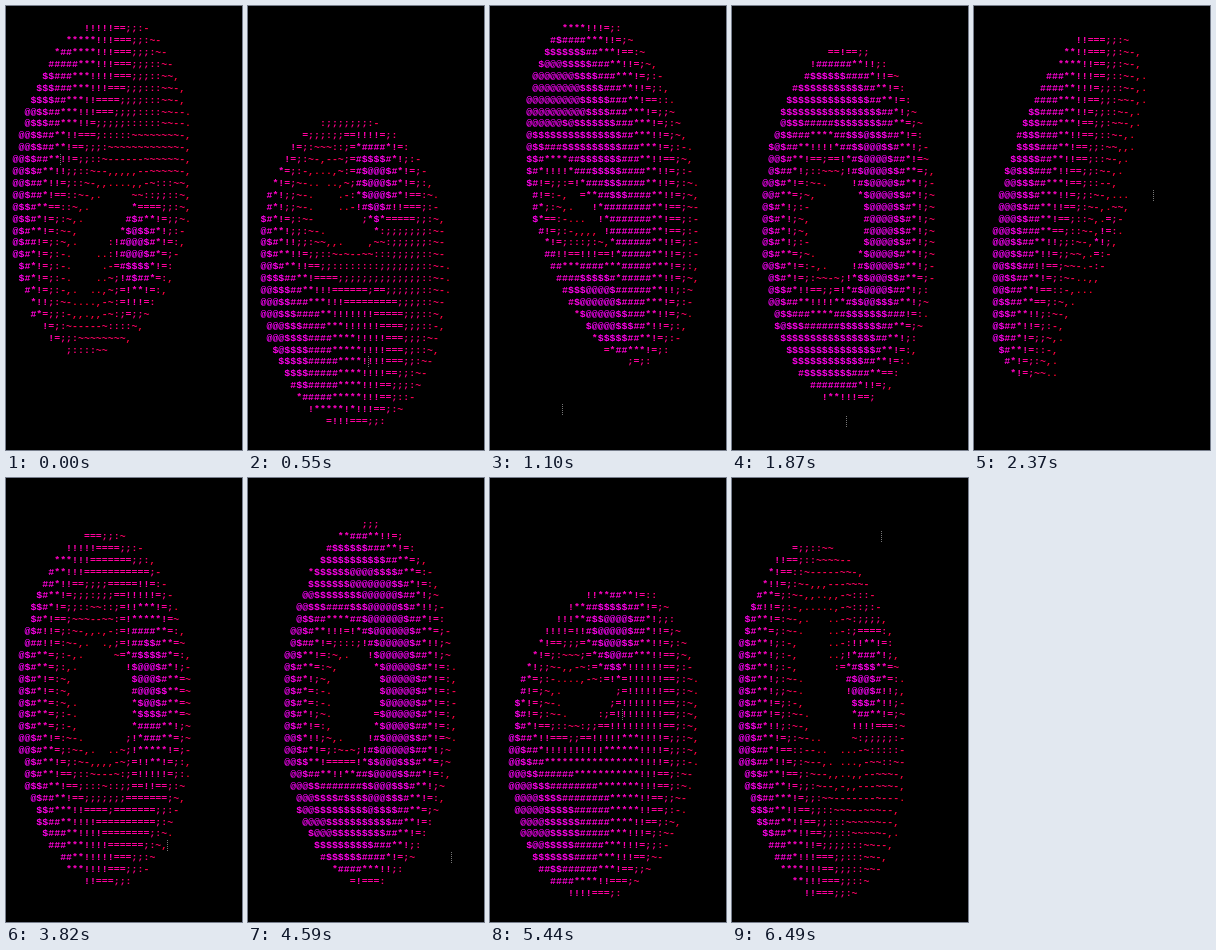
These frames come from a looping animation (236x444 px, 6.56 s). An HTML page with a canvas:

```html
<!DOCTYPE html>
<html>
<head>
<meta charset="utf-8">
<style>
html, body { margin: 0; height: 100%; overflow: hidden; background: #000; }
canvas { display: block; }
</style>
</head>
<body>
<canvas id="stage" width="236" height="444"></canvas>
<script>
const LOOP = 6560, STEP = 70, SIZE = 36;
const CELL_W = 5.95, CELL_H = 11.9, LEFT = 0.6, MIDDLE = 10.1;
const R1 = 1, R2 = 2, DIST = 5;
const SCALE = SIZE * DIST * 3 / (8 * (R1 + R2));
const SHADES = '.,-~:;=!*#$@';
const ctx = document.getElementById('stage').getContext('2d');
const { sin, cos, floor, round } = Math;

// Lit points of the torus; the light comes from the left and the viewer.
function torus(a, b) {
  const sA = sin(a), cA = cos(a), sB = sin(b), cB = cos(b);
  const depth = new Float32Array(SIZE * SIZE);
  const shade = new Int8Array(SIZE * SIZE).fill(-1);
  for (let th = 0; th < 6.283; th += 0.07) {
    const ct = cos(th), st = sin(th), cx = R2 + R1 * ct, cy = R1 * st;
    for (let ph = 0; ph < 6.283; ph += 0.02) {
      const cp = cos(ph), sp = sin(ph);
      const light = cp * ct * sB - cA * sp * ct - sA * st + cB * (cA * st - sp * ct * sA);
      const level = round(light * 8);
      if (level < 0) continue;
      const x = cx * (cB * cp + sA * sB * sp) - cy * cA * sB;
      const y = cx * (sB * cp - sA * cB * sp) + cy * cA * cB;
      const near = 1 / (DIST + cA * sp * cx + cy * sA);
      const row = floor(SIZE / 2 + SCALE * near * x);
      const col = floor(SIZE / 2 - SCALE * near * y);
      const i = row * SIZE + col;
      if (near > depth[i]) {
        depth[i] = near;
        shade[i] = level;
      }
    }
  }
  return shade;
}

// The terminal cursor is caught at an arbitrary cell on each step.
function drawCursor(n) {
  const row = (12 + n * 23) % SIZE, col = (9 + n * 17) % SIZE;
  ctx.fillStyle = '#777';
  for (let k = -5; k < 6; k += 2) {
    ctx.fillRect(round(LEFT + col * CELL_W), round(MIDDLE + row * CELL_H) + k, 1, 1);
  }
}

function draw(n) {
  const t = n * STEP / 1000;
  const shade = torus(-0.83 + 3.2 * t, 4.2 + 1.2 * t);
  ctx.fillStyle = '#000';
  ctx.fillRect(0, 0, 236, 444);
  ctx.font = 'bold 9.9px "Liberation Mono", monospace';
  shade.forEach((level, i) => {
    if (level < 0) return;
    ctx.fillStyle = `hsl(${350 - level * 4.5}, 100%, 50%)`;
    ctx.fillText(SHADES[level], LEFT + i % SIZE * CELL_W, MIDDLE + 3.2 + floor(i / SIZE) * CELL_H);
  });
  drawCursor(n);
}

let shown = -1;
function tick() {
  const n = floor(performance.now() % LOOP / STEP);
  if (n !== shown) draw(shown = n);
  requestAnimationFrame(tick);
}
tick();
</script>
</body>
</html>
```
